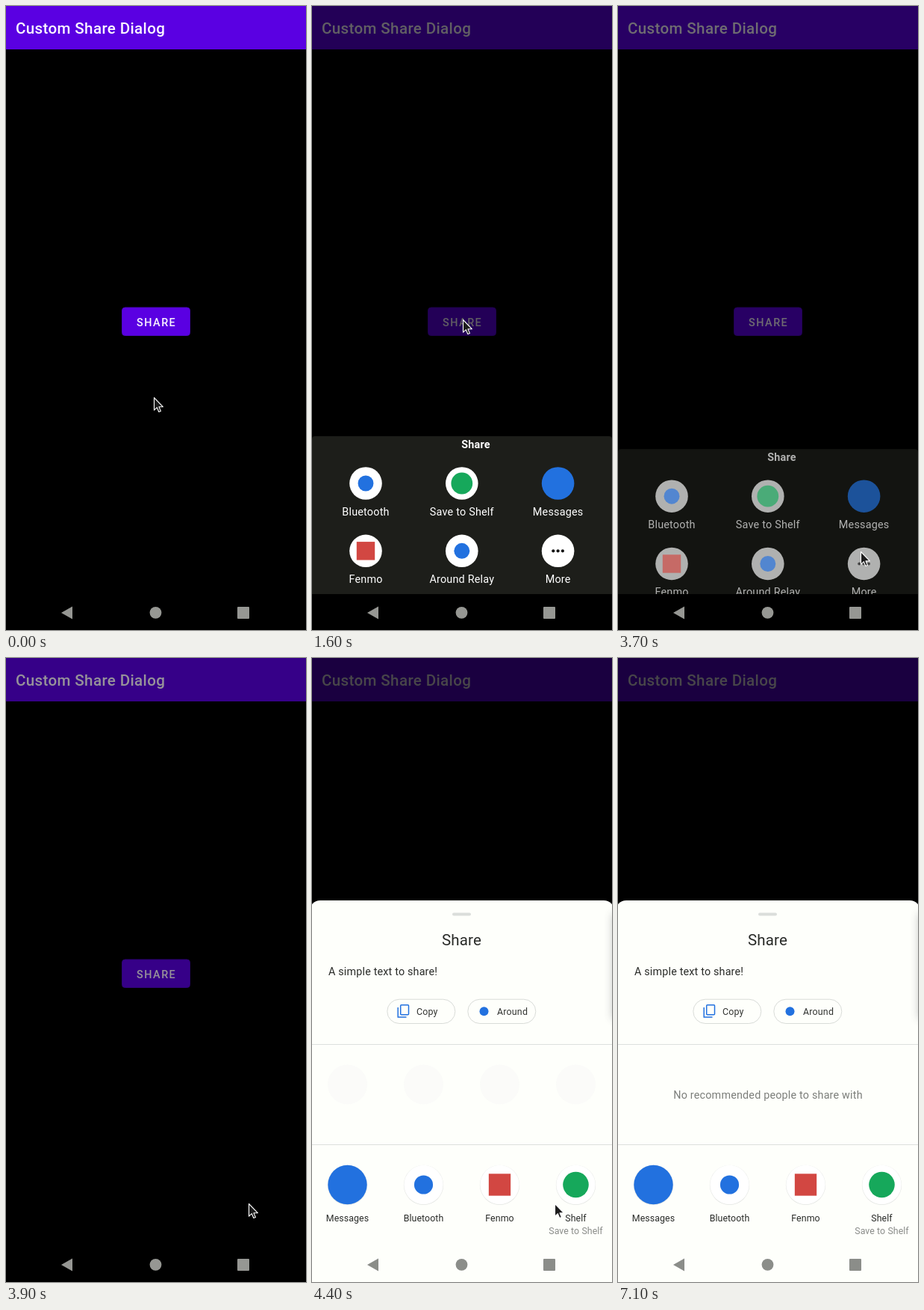
Animation, 402 px wide and 834 px high, one loop 9 s. Source, as an HTML page with a canvas:

```html
<!DOCTYPE html>
<html lang="en">
<head>
<meta charset="utf-8">
<title>Custom Share Dialog</title>
<style>
  html, body { margin: 0; width: 100%; height: 100%; overflow: hidden; background: #000; }
  canvas { display: block; width: 402px; height: 834px; }
</style>
</head>
<body>
<canvas id="stage" width="402" height="834"></canvas>
<script>
const W = 402, H = 834, NAV = 786, LOOP = 9000, STEP = 100;
const ctx = document.getElementById('stage').getContext('2d');
const PAPER = '#fefffb', BLUE = '#2271df', PURPLE = '#5a00e2', INK = '#292b28';

// Progress from 0 to 1 between two times
const ramp = (t, start, end) => Math.min(1, Math.max(0, (t - start) / (end - start)));
const smooth = p => p * p * (3 - 2 * p);
const easeOut = p => 1 - (1 - p) ** 3;

function shape(fill, stroke, width = 1) {
  if (fill) { ctx.fillStyle = fill; ctx.fill(); }
  if (stroke) { ctx.strokeStyle = stroke; ctx.lineWidth = width; ctx.stroke(); }
}

function box(x, y, w, h, r, fill, stroke, width) {
  ctx.beginPath();
  ctx.roundRect(x, y, w, h, r);
  shape(fill, stroke, width);
}

function disc(x, y, r, fill) {
  ctx.beginPath();
  ctx.arc(x, y, r, 0, Math.PI * 2);
  shape(fill);
}

function outline(path, fill, stroke, width) {
  const p = new Path2D(path);
  if (fill) { ctx.fillStyle = fill; ctx.fill(p); }
  if (stroke) { ctx.strokeStyle = stroke; ctx.lineWidth = width; ctx.stroke(p); }
}

function text(str, x, y, { size = 14.4, weight = 400, color = '#fff', align = 'left', gap = .2 } = {}) {
  ctx.font = `${weight} ${size}px Roboto, sans-serif`;
  ctx.letterSpacing = gap + 'px';
  ctx.textAlign = align;
  ctx.fillStyle = color;
  ctx.fillText(str, x, y);
}

function moved(dy, alpha, draw) {
  if (alpha <= 0) return;
  ctx.save();
  ctx.translate(0, dy);
  ctx.globalAlpha = alpha;
  draw();
  ctx.restore();
}

const dot = (size, color) => (x, y, r) => disc(x, y, r * size, color);
const badges = {
  messages: dot(1, BLUE),
  bluetooth: dot(.48, BLUE),
  mail: (x, y, r) => box(x - r * .56, y - r * .56, r * 1.12, r * 1.12, 0, '#d24742'),
  storage: dot(.66, '#16a85b'),
  around: dot(.48, BLUE),
  more: (x, y) => [-1, 0, 1].forEach(i => disc(x + 6.3 * i, y, 2.1, '#141414'))
};

function badge(kind, x, y, r) {
  if (kind !== 'messages') disc(x, y, r, '#fff');
  badges[kind](x, y, r);
}

function page(pressed) {
  box(0, 0, W, 58, 0, PURPLE);
  text('Custom Share Dialog', 13, 37, { size: 20.6, weight: 500, gap: .35, color: '#fbf5ff' });
  box(155.5, 403, 91, 37.5, 4, PURPLE, '#4a06bd');
  if (pressed) box(156, 403, 90, 37, 4, 'rgba(255,255,255,.2)');
  text('SHARE', 175, 427.5, { weight: 500, gap: 1.5, color: '#fbf5ff' });
}

function panel() {
  box(0, 575, W, 211, [4, 4, 0, 0], '#1d1e1a');
  text('Share', 219.5, 591, { weight: 700, align: 'center' });
  const items = [
    ['bluetooth', 'Bluetooth'], ['storage', 'Save to Shelf'], ['messages', 'Messages'],
    ['mail', 'Fenmo'], ['around', 'Around Relay'], ['more', 'More']
  ];
  items.forEach(([kind, label], i) => {
    const x = 72 + 128.8 * (i % 3), y = 638 + 90.3 * Math.floor(i / 3);
    badge(kind, x, y, 21.8);
    text(label, x, y + 43, { align: 'center' });
  });
}

function chip(x, label, textX) {
  box(x, 456.2, 91, 32.3, 16.1, PAPER, '#d9dcd8');
  text(label, textX, 477, { size: 12.4, color: '#333532' });
}

function sheet(ghostAlpha) {
  box(-3, 324, W + 6, H, 14, PAPER);
  box(188, 340.5, 25, 4, 2, '#dbdedb');
  text('Share', 200.5, 384, { size: 20.5, align: 'center', color: INK });
  text('A simple text to share!', 22, 424, { size: 14.33, color: INK, gap: .18 });

  chip(100.8, 'Copy', 140);
  box(118.7, 463.8, 10.8, 13, 1, null, BLUE, 1.5);
  outline('M115.2 467v13h11.3', null, BLUE, 1.5);
  chip(208.8, 'Around', 248);
  disc(230.5, 472.2, 6, BLUE);

  for (const y of [516, 650]) box(0, y, W, 1, 0, '#dde0dd');

  const apps = [['messages', 'Messages'], ['bluetooth', 'Bluetooth'], ['mail', 'Fenmo'], ['storage', 'Shelf', 'Save to Shelf']];
  apps.forEach(([kind, label, note = ''], i) => {
    const x = 47.5 + 102 * i, style = { size: 12.35, align: 'center', gap: .08 };
    moved(0, ghostAlpha, () => disc(x, 570, 26.5, '#f5f6f5'));
    disc(x, 704.4, 26.6, '#e3e5e2');
    badge(kind, x, 704, 26.2);
    text(label, x, 753.3, { ...style, color: INK });
    text(note, x, 770, { ...style, color: '#8a8c89' });
  });
}

// Soft shadow cast from just beyond the right edge
function edgeShadow() {
  ctx.save();
  ctx.shadowColor = 'rgba(50,50,60,.3)';
  ctx.shadowBlur = 12;
  box(W + 1, 342, 20, 140, 0, '#000');
  ctx.restore();
}

function navIcons(color) {
  outline('M74 811l15-8.5v17z', color);
  disc(200.5, 810.8, 7.9, color);
  box(310, 803, 16, 16, 1, color);
}

function navGhosts() {
  outline('M75 812l14 8M193 813a8 8 0 0 0 15 0M310 816v3.5h16', null, '#e9ebe8', 1);
}

function pointer(t) {
  const a = smooth(ramp(t, 500, 900)), b = smooth(ramp(t, 2200, 2900)), c = ramp(t, 6800, 7000);
  ctx.save();
  ctx.translate(198.5 + 4 * a + 123 * b + 32 * c, 523.5 - 104 * a + 310 * b + 13 * c);
  ctx.lineJoin = 'round';
  outline('M0 0v16.7l3.8-3.5 2.5 5.8 2.6-1.1-2.4-5.7h5.3z', '#1c1c1c', '#fff', 1.1);
  ctx.restore();
}

function drawPanel(t) {
  const enter = easeOut(ramp(t, 1100, 1600)), leave = ramp(t, 3600, 3900);
  const settle = t < 2000 ? 0 : -.6;
  moved(160 * (1 - enter + leave ** 2) + settle, enter * (1 - leave), panel);
}

function drawSheet(t) {
  const landed = t >= 4400;
  moved(516 * (1 - ramp(t, 4000, 4400)) ** 1.25, 1, () => sheet(landed ? .4 * (t < 5500) : 1));
  if (t < 4300) navGhosts();
  else navIcons('#8b8d89');
  if (landed) edgeShadow();

  const shown = ramp(t, 5700, 5900);
  moved(8 * (1 - shown), shown, () =>
    text('No recommended people to share with', 201, 588.5, { size: 14.33, align: 'center', color: '#7b7d7a' }));
}

function dim(t) {
  return t < 3900
    ? .61 * smooth(ramp(t, 1100, 1600)) - .21 * smooth(ramp(t, 3600, 3900))
    : .4 + .315 * easeOut(ramp(t, 3900, 4400));
}

function render(t) {
  ctx.fillStyle = '#000';
  ctx.fillRect(0, 0, W, H);

  page(t >= 1100 && t < 1300);
  ctx.fillStyle = `rgba(0,0,0,${dim(t)})`;
  ctx.fillRect(0, 0, W, NAV);
  drawPanel(t);

  box(0, NAV, W, H - NAV, 0, '#000');
  navIcons('#969793');
  if (t > 4000) drawSheet(t);
  if (t < 7100) pointer(t);
}

function tick() {
  const t = performance.now() % LOOP;
  render(Math.floor(t / STEP) * STEP);
  requestAnimationFrame(tick);
}
tick();
</script>
</body>
</html>
```
